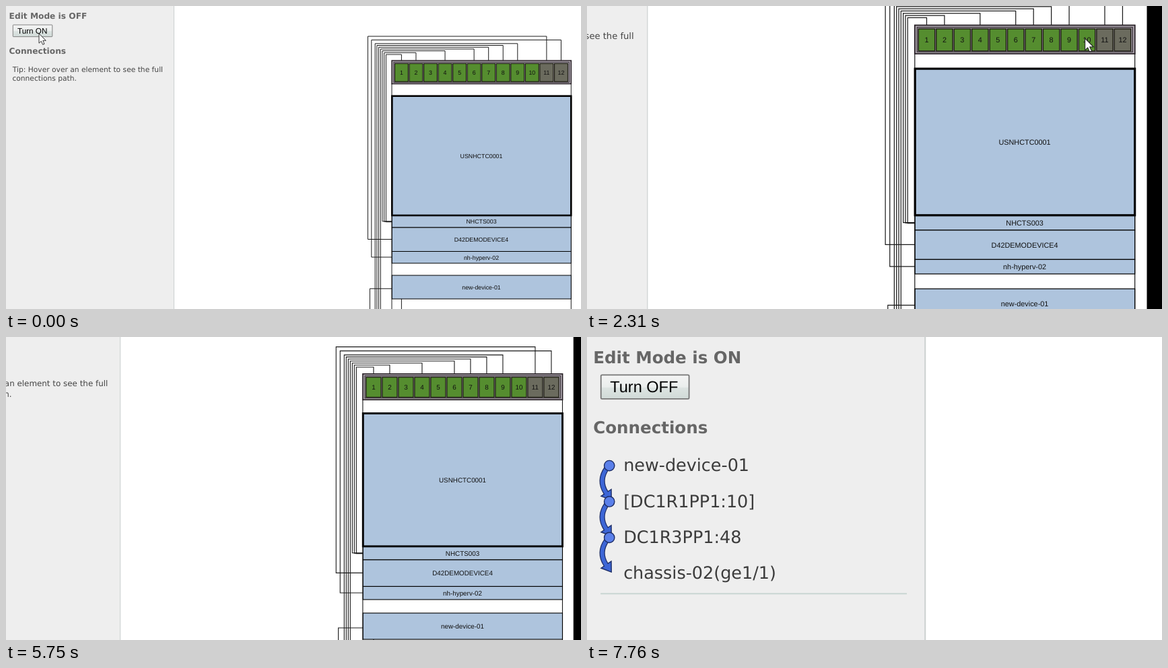
An HTML page that plays this animation: 854 by 450 pixels, repeating every 7.89 s.

```html
<!DOCTYPE html>
<html lang="en">
<head>
<meta charset="utf-8">
<title>Patch panel edit mode</title>
<style>
  html, body { margin: 0; width: 100%; height: 100%; overflow: hidden; background: #000; }
  svg { display: block; width: 854px; height: 450px; }
  text { font-family: "Liberation Sans", Arial, sans-serif; font-size: 8.85px; text-rendering: geometricPrecision; white-space: pre; }
  .mid { text-anchor: middle; }
  .head { font: bold 12.2px "DejaVu Sans", Verdana, sans-serif; fill: #666; }
  .tip { font: 10.7px "DejaVu Sans", Verdana, sans-serif; fill: #444; }
  .item { font: 12.65px "DejaVu Sans", Verdana, sans-serif; fill: #3c3c3c; }
  .wire { fill: none; stroke: #1a1a1a; stroke-width: 1; }
  .bold { fill: none; stroke: #000; stroke-width: 2.7; }
  .chain { fill: none; stroke-linecap: round; }
</style>
</head>
<body>
<svg viewBox="0 0 854 450" xmlns="http://www.w3.org/2000/svg">
  <defs>
    <linearGradient id="btn" x2="0" y2="1">
      <stop offset="0" stop-color="#f4f4f4"/><stop offset=".5" stop-color="#ebeeed"/>
      <stop offset=".55" stop-color="#dce3e1"/><stop offset="1" stop-color="#d0dad7"/>
    </linearGradient>
  </defs>
  <g id="cam">
    <rect width="854" height="480" fill="#fff"/>
    <rect width="249.5" height="480" fill="#eee"/>
    <path d="M249.5 0V480" stroke="#ccd1d0"/>
    <g id="mode"></g>
    <text class="head" x="4.6" y="70.8">Connections</text>
    <g id="list"></g>
    <g id="rack"></g>
    <g id="marks"></g>
    <g id="hover"></g>
    <path id="drag" fill="none" stroke="#ff0" stroke-width="2.5"/>
    <path id="arrow" d="M0 0V14.2L3.3 11.2L5.6 16.3L8 15.3L5.8 10.3H10.3Z" fill="#fff" stroke="#222" stroke-width=".9"/>
    <path id="beam" d="M-2.5-7H2.5M0-7V7M-2.5 7H2.5" fill="none" stroke="#a5a5a5" stroke-width="1"/>
    <rect x="854" width="400" height="480" y="-20" fill="#000"/>
  </g>
</svg>
<script>
const LOOP = 7890;
const $ = id => document.getElementById(id);

const LEFT = 573, WIDTH = 266, MID = 706;
const devices = [
  { name: 'USNHCTC0001', y: 133.7, h: 177.3 },
  { name: 'NHCTS003', y: 311, h: 18 },
  { name: 'D42DEMODEVICE4', y: 329, h: 35.5 },
  { name: 'nh-hyperv-02', y: 364.5, h: 17.5 },
  { name: 'new-device-01', y: 400, h: 35 }
];
const portX = n => 587.4 + 21.55 * (n - 1);

// Ports from the outermost wire inwards, with the height where each one ends
const order = [11, 12, 9, 8, 7, 6, 4, 2, 1];
const ends = { 11: 346.5, 12: 373, 4: 319.8, 2: 320.2, 1: 320.7 };
const wires = {};
order.forEach((n, i) => {
  const d = i < 2 ? 5.4 * i : 5.4 + 2.7 * i;
  const tail = ends[n] ? `V${ends[n]}H${LEFT}` : 'V480';
  wires[n] = `M${portX(n)} 81V${45 + d}H${537.4 + d}${tail}`;
});
const newWire = `M${LEFT} 417.3H535V42.3H${portX(10)}V81M${portX(10)} 53.5H880`;

const chains = {
  10: ['new-device-01', '[DC1R1PP1:10]', 'DC1R3PP1:48', 'chassis-02(ge1/1)'],
  11: ['D42DEMODEVICE4', '[DC1R1PP1:11]'],
  12: ['nh-hyperv-02', '[DC1R1PP1:12]']
};
const owner = { 10: 4, 11: 2, 12: 3 };

// Timelines: [time, value], the last one reached holds
const modes = [[0, 'OFF'], [200, 'ON']];
const hovers = [[0, 0], [1150, 11], [1780, 0], [3290, 11], [3400, 12], [3540, 0], [6290, 10]];
const targets = [[0, -1], [2800, 0], [3260, 1], [3300, 2], [3400, 3], [3550, -1], [3610, 4], [5550, -1]];

// Motion: [time, x, y]
const pointer = [
  [0, 49, 41], [300, 49, 41], [760, 842, 72], [1150, 804.5, 101], [1690, 804.5, 101],
  [1900, 778, 94], [2120, 778, 94], [2310, 779, 97], [2700, 779, 97], [3460, 706.8, 379],
  [3490, 706.8, 379], [3820, 710, 416], [4560, 710, 416], [4730, 864, 290],
  [6200, 864, 120], [6380, 776, 98.5]
];
const lineEnd = [[2700, 779, 97], [3460, 705.1, 365], [3490, 705.1, 365], [3820, 710, 414.5]];

const held = (table, t) => table.filter(r => r[0] <= t).pop()[1];

function along(table, t) {
  const i = table.findIndex(r => r[0] > t);
  if (i < 0) return table[table.length - 1].slice(1);
  if (i === 0) return table[0].slice(1);
  const [a, b] = [table[i - 1], table[i]];
  const p = (t - a[0]) / (b[0] - a[0]);
  return [a[1] + (b[1] - a[1]) * p, a[2] + (b[2] - a[2]) * p];
}

// Linear zoom that advances in 30 ms steps
const steps = (t, from, n) => Math.max(0, Math.min(1, Math.floor((t - from) / 30) / n));

function camera(t) {
  if (t >= 6680) return [1 + 1.013 * steps(t, 6680, 36), 0, 0];
  const s = 1 + 0.2274 * (steps(t, 790, 30) - steps(t, 5300, 30));
  return [s, 952 * (1 - s), 312 * (1 - s)];
}

const rect = (x, y, w, h, style) => `<rect x="${x}" y="${y}" width="${w}" height="${h}" ${style}/>`;
const label = (x, y, s, extra) => `<text x="${x}" y="${y}" ${extra}>${s}</text>`;

function deviceBox(d, fill, ink) {
  return rect(LEFT + .3, d.y, WIDTH, d.h, `fill="${fill}" stroke="#000" stroke-width="${d === devices[0] ? 2.6 : 1}"`) +
    label(MID, d.y + d.h / 2 + 3.3, d.name, `class="mid" fill="${ink}"`);
}

function portBox(n, fill, ink) {
  return rect(portX(n) - 9.9, 85.5, 19.8, 26.7, `fill="${fill}" stroke="#1c1c10" stroke-width="1.1"`) +
    label(portX(n), 102.1, n, `class="mid" fill="${ink}"`);
}

function drawRack() {
  let s = `<path class="wire" d="M${LEFT} 115V480M839.3 115V480M${LEFT} 419.8H540.4V480M587.4 435V480"/>`;
  s += Object.values(wires).map(d => `<path class="wire" d="${d}"/>`).join('');
  s += rect(LEFT, 81, 266.4, 34.6, 'fill="#aaa3ab" stroke="#241c22" stroke-width="1.4"');
  s += rect(575.8, 83.6, 260.8, 29.8, 'fill="#98929a" stroke="#2a2228" stroke-width=".8"');
  for (let n = 1; n <= 12; n++) s += portBox(n, n > 10 ? '#6b6b5e' : '#558d2f', '#111');
  const [big, ...rest] = devices;
  return s + [...rest, big].map(d => deviceBox(d, '#aec4dd', '#111')).join('');
}

function drawMode(mode) {
  return label(4.6, 19.4, `Edit Mode is ${mode}`, 'class="head"') +
    rect(10.3, 28, mode === 'ON' ? 65 : 58.5, 17.6, 'rx=".8" fill="url(#btn)" stroke="#777" stroke-width=".9"') +
    label(17, 40.6, `Turn ${mode === 'ON' ? 'OFF' : 'ON'}`, 'style="font-size:11.7px"');
}

function drawList(port) {
  const items = chains[port];
  if (!items) {
    return label(9.8, 97.6, 'Tip: Hover over an element to see the full', 'class="tip"') +
      label(9.4, 111.4, 'connections path.', 'class="tip"');
  }
  const gap = 26.55;
  let s = '';
  items.forEach((name, i) => {
    const y = 94.9 + gap * i;
    s += label(26.9, 98.9 + gap * i, name, 'class="item"');
    if (i === items.length - 1) return;
    const arc = `M14.5 ${y + 2}Q8.2 ${y + 11} 14 ${y + 20}`;
    s += `<path class="chain" d="${arc}" stroke="#1d2d66" stroke-width="4"/>` +
      `<path d="M18 ${y + 25.4}L10.4 ${y + 22.5}L17.9 ${y + 17.5}Z" fill="#3d66d6" stroke="#1d2d66" stroke-width=".7"/>` +
      `<path class="chain" d="${arc}" stroke="#3d66d6" stroke-width="2.8"/>`;
  });
  for (let i = 0; i < items.length - 1; i++) {
    s += `<circle cx="16.5" cy="${94.9 + gap * i}" r="3.8" fill="#5b80ea" stroke="#1d2d66" stroke-width=".7"/>`;
  }
  const y = 94.4 + gap * (items.length - 1) + 15.3;
  return s + `<path d="M10 ${y}H236" stroke="#c9d6d2"/>`;
}

function drawHover(port) {
  if (!port) return '';
  const d = devices[owner[port]];
  return `<path class="bold" d="${wires[port] || newWire}"/>` +
    rect(LEFT + .3, d.y, WIDTH, d.h, 'class="bold" style="stroke-width:2.2"') +
    rect(portX(port) - 10, 85.6, 20, 26.6, 'class="bold"');
}

function drawMarks(target, dragging) {
  return (dragging ? portBox(10, '#abab25', '#7d7d1c') : '') +
    (target >= 0 ? deviceBox(devices[target], '#c5ce8a', '#70751f') : '');
}

// Redraw a group only when its state changes
const shown = {};
function show(id, key, draw) {
  if (shown[id] === key) return;
  shown[id] = key;
  $(id).innerHTML = draw();
}

function place(id, visible, x, y) {
  $(id).setAttribute('display', visible ? 'inline' : 'none');
  $(id).setAttribute('transform', `translate(${x} ${y})`);
}

function render(t) {
  const [s, x, y] = camera(t);
  $('cam').setAttribute('transform', `matrix(${s} 0 0 ${s} ${x} ${y})`);

  const mode = held(modes, t), port = held(hovers, t), target = held(targets, t);
  const dragging = t >= 2700 && t < 5550;
  show('mode', mode, () => drawMode(mode));
  show('list', port, () => drawList(port));
  show('hover', port, () => drawHover(port));
  show('marks', `${target} ${dragging}`, () => drawMarks(target, dragging));

  const [ex, ey] = along(lineEnd, t);
  $('drag').setAttribute('d', dragging ? `M779.3 96L${ex} ${ey}` : '');

  const [px, py] = along(pointer, t);
  const beam = t >= 1150 && t < 1780;
  place('arrow', !beam, px, py);
  place('beam', beam, px, py);
}

$('rack').innerHTML = drawRack();
const start = performance.now();
function tick() {
  render((performance.now() - start) % LOOP);
  requestAnimationFrame(tick);
}
tick();
</script>
</body>
</html>
```
